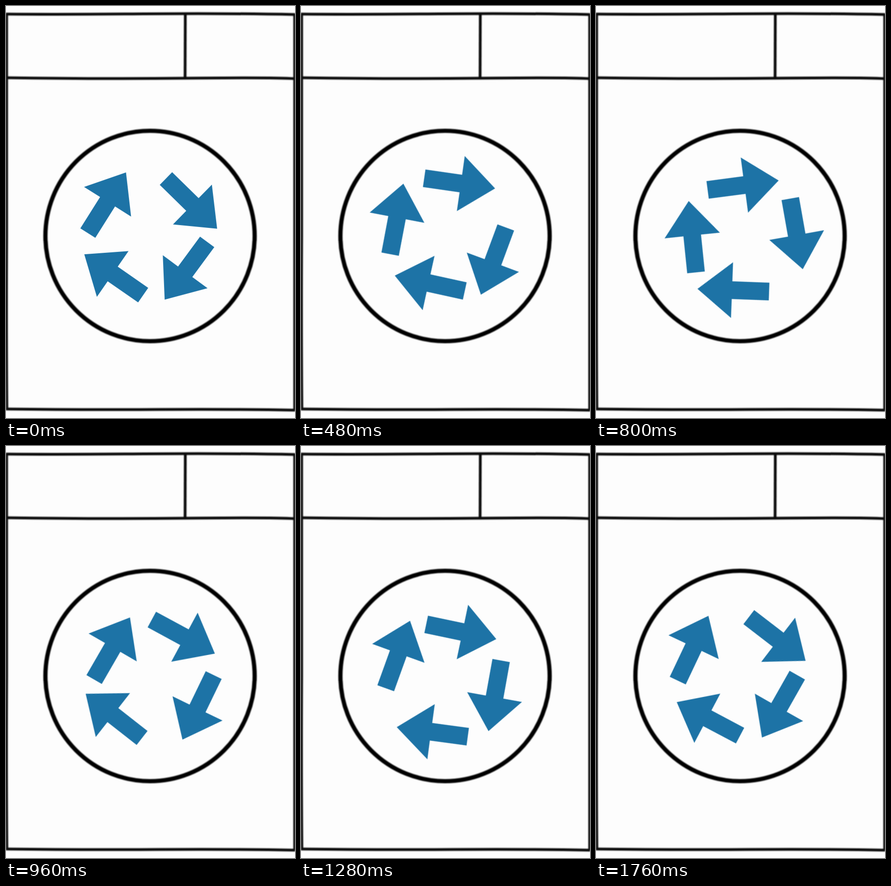
Write an HTML page that moves like this. It is 627x893 px and loops after 1840 ms.

```html
<!DOCTYPE html>
<html lang="en">
<head>
<meta charset="utf-8">
<title>Washing machine</title>
<style>
  html, body { margin: 0; width: 100%; height: 100%; overflow: hidden; background: #fdfdfd; }
  svg { display: block; width: 100%; height: 100%; }
  .outline { fill: none; stroke: #0b0b0b; stroke-width: 6; filter: blur(.9px); }
  .drum { stroke: #000; stroke-width: 9.2; }
  .soft { filter: blur(.5px); }
  .arrows { fill: #1d73a6; animation: spin 1840ms -2ms infinite; }

  /* Rests for three 80 ms ticks, then turns at a constant rate, one step per tick. */
  @keyframes spin {
    0% { transform: rotate(0deg); animation-timing-function: step-end; }
    13.0435% { transform: rotate(12.1deg); animation-timing-function: steps(20, end); }
    100% { transform: rotate(371.1deg); }
  }
</style>
</head>
<body>
<svg viewBox="0 0 627 893" preserveAspectRatio="none">
  <defs>
    <!-- Tip at the origin, pointing right -->
    <path id="arrow" d="M0 0L-75 -60.3V-19.2H-155.4V19.2H-75V60.3Z"/>
  </defs>

  <g class="outline">
    <path d="M0 17.5Q120 18.5 300 17T627 18.5"/>
    <path d="M0 155.5Q200 158.5 390 156.5T627 157.5"/>
    <path d="M389 17Q388.5 90 388.5 156"/>
    <path d="M2 16Q3 300 2 500T2.5 874" stroke-width="4.8"/>
    <path d="M625.5 17Q624.5 400 625.5 876" stroke-width="4.4"/>
    <path d="M0 873.5Q160 875.5 330 874.5T627 876"/>
    <ellipse class="drum" cx="312.5" cy="498.5" rx="227" ry="228"/>
  </g>

  <g class="soft" transform="translate(313.9 501.9)">
    <g class="arrows">
      <use href="#arrow" transform="translate(-53.6 -141.2) rotate(-57.8)"/>
      <use href="#arrow" transform="translate(144.1 -19.2) rotate(44.4)"/>
      <use href="#arrow" transform="translate(30.3 134.4) rotate(126.4)"/>
      <use href="#arrow" transform="translate(-144.1 36.2) rotate(214.7)"/>
    </g>
  </g>
</svg>
</body>
</html>
```
